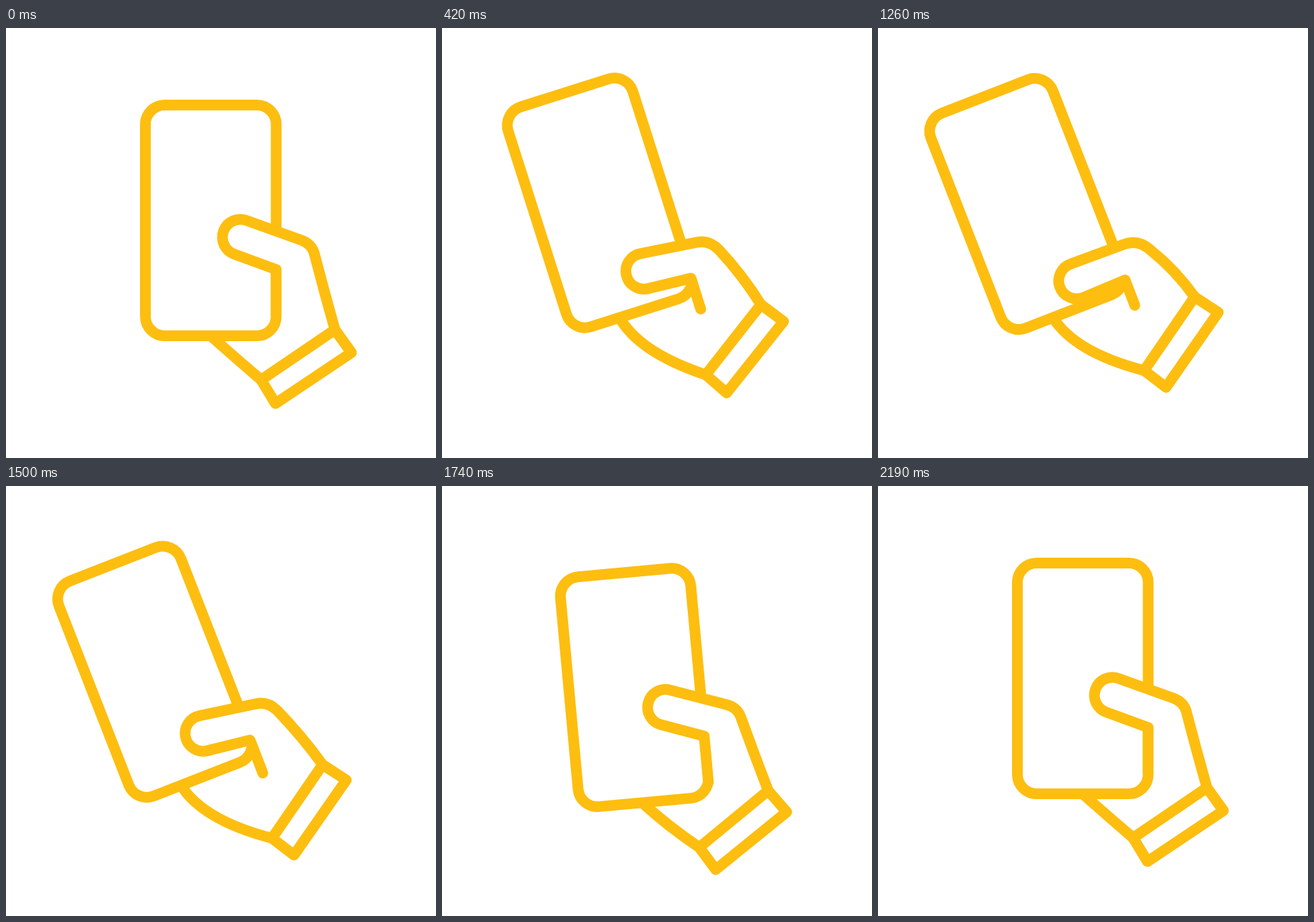
An HTML page with a canvas for the animation above (3.44 s loop, 600 px wide and 600 px high).

```html
<!DOCTYPE html>
<html lang="en">
<head>
<meta charset="utf-8">
<title>Hand and phone</title>
<style>
  html, body { margin: 0; width: 100%; height: 100%; overflow: hidden; background: #fff; }
  canvas { display: block; width: 600px; height: 600px; }
</style>
</head>
<body>
<canvas id="stage" width="600" height="600"></canvas>
<script>
const ctx = document.getElementById('stage').getContext('2d');
const LOOP = 3440, STEP = 30;
const TILT = 21.3 * Math.PI / 180;
const THUMB = 25;    // thumb tip radius
const SLIDE = 53.5;  // how far the phone slides out of the hand

// All points lie in the frame of the arm, whose origin is the cuff centre
const wrist = [40.75, -51.25], heel = [-62.25, 18.75];
const cuff = [wrist, [63.75, -19.25], [-42.25, 51.75], heel];
const creaseEnd = [-41.25, -70.7];

const open = {
  tip: [-91.25, -180.25], crease: [-41.25, -135.25],
  top: [-6.25, -176.25], knuckle: [7.75, -171.25], back: [11.75, -158.25], side: [25.75, -104.25],
  palm: [-132.25, -42.25], bend: [-97.25, -11.25]
};
const shut = {
  tip: [-104.5, -132], crease: [-41, -108.5],
  top: [-23.5, -155.5], knuckle: [-3.5, -155], back: [7, -135], side: [30, -95.5],
  palm: [-154, -97], bend: [-143.5, -40]
};

// Smooth rise from 0 to 1 between two times
function ease(t, from, to) {
  const u = Math.min(1, Math.max(0, (t - from) / (to - from)));
  return u * u * (3 - 2 * u);
}

// Angle on the thumb tip where a line to p touches it
function touch(tip, p, side) {
  const dx = p[0] - tip[0], dy = p[1] - tip[1];
  return Math.atan2(dy, dx) + side * Math.acos(THUMB / Math.hypot(dx, dy));
}

function paint() {
  ctx.fill();
  ctx.stroke();
}

function drawPalm(mix) {
  ctx.beginPath();
  ctx.moveTo(...mix('palm'));
  ctx.quadraticCurveTo(...mix('bend'), ...heel);
  ctx.stroke();
}

function drawPhone(x, y) {
  ctx.beginPath();
  ctx.roundRect(x - 91.25, y - 161, 182.5, 322, 27);
  paint();
}

function drawFingers(mix) {
  const tip = mix('tip'), crease = mix('crease'), top = mix('top');
  ctx.beginPath();
  ctx.moveTo(...wrist);
  ctx.quadraticCurveTo(...mix('side'), ...mix('back'));
  ctx.quadraticCurveTo(...mix('knuckle'), ...top);
  ctx.arc(...tip, THUMB, touch(tip, top, -1), touch(tip, crease, 1), true);
  ctx.lineTo(...crease);
  ctx.lineTo(...creaseEnd);
  paint();
}

function drawCuff() {
  ctx.beginPath();
  cuff.forEach(p => ctx.lineTo(...p));
  ctx.closePath();
  paint();
}

function draw(t) {
  const home = ease(t, 1500, 1855);
  const tilt = ease(t, 0, 570) - home;
  const lift = 36 * ease(t, 0, 660) - 27 * ease(t, 1170, 1780) - 23 * home + 14 * ease(t, 1690, 2190);
  const slide = 56 * ease(t, 0, 515) - 2.5 * ease(t, 540, 780) - SLIDE * ease(t, 1490, 1820);
  const curl = ease(t, 0, 640) - ease(t, 1290, 1755);
  const mixBy = amount => name => open[name].map((v, i) => v + (shut[name][i] - v) * amount);

  ctx.resetTransform();
  ctx.fillStyle = '#fff';
  ctx.fillRect(0, 0, 600, 600);
  ctx.strokeStyle = '#fdbe10';
  ctx.lineWidth = 15;
  ctx.lineCap = ctx.lineJoin = 'round';
  ctx.translate(418.25 + 4.2 * tilt, 472.25 - lift);
  ctx.rotate(-TILT * tilt);

  drawPalm(mixBy(slide / SLIDE));
  drawPhone(2.2 * tilt - 132.5, -203.75 - slide);
  drawFingers(mixBy(curl));
  drawCuff();
}

const start = performance.now();
function tick() {
  const t = (performance.now() - start) % LOOP;
  draw(Math.floor(t / STEP) * STEP);
  requestAnimationFrame(tick);
}
tick();
</script>
</body>
</html>
```
